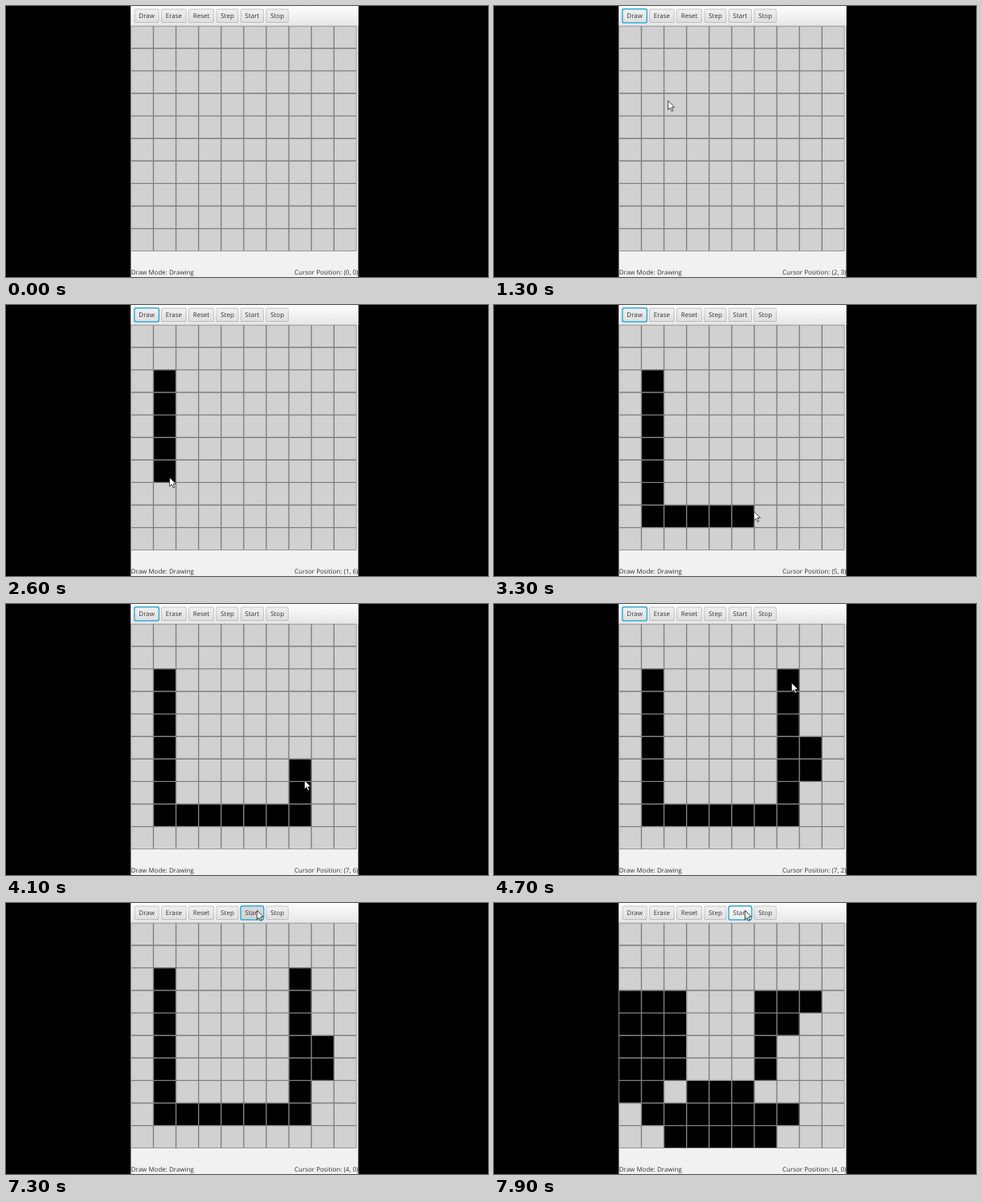
These frames come from a looping animation (600x338 px, 8000 ms). An HTML page with a canvas:

```html
<!DOCTYPE html>
<html lang="en">
<head>
<meta charset="utf-8">
<title>Cell grid</title>
<style>
  html, body { margin: 0; width: 100%; height: 100%; overflow: hidden; background: #000; }
  canvas { display: block; width: 600px; height: 338px; }
</style>
</head>
<body>
<canvas id="stage" width="600" height="338"></canvas>
<script>
const ctx = document.getElementById('stage').getContext('2d');
const LOOP = 8000, TICK = 100;
const N = 10, PITCH = 28.1, LEFT = 155.4, TOP = 24.7, SIZE = N * PITCH;
const WIDTH = 283.1, BUTTON_TOP = 3.6, BUTTON_HEIGHT = 17.4, PADDING = 5.6, GAP = 2.6;
const SHOW_CURSOR = 500, FOCUS_DRAW = 1000, PEN_DOWN = 2100, PEN_UP = 4800;
const FOCUS_START = 7200, RELEASE = 7400, STEP_AT = 7900;

ctx.font = '8px "Open Sans", "Noto Sans", sans-serif';
ctx.textRendering = 'geometricPrecision';

// Eased pointer moves
const HOME = { x: 160, y: 30 };
const move = (from, to, x, y) => ({ from, to, x, y });
const MOVES = [
  move(100, 300, 240, 100),
  move(400, 800, 170, 14),
  move(1000, 1350, 219, 124),
  move(1400, 1800, 198, 91),
  move(2100, 2850, 205, 258),
  move(3000, 3400, 345, 257),
  move(3400, 3950, 366, 260),
  move(3950, 4150, 372, 212),
  move(4150, 4250, 388, 206),
  move(4250, 4350, 382, 182),
  move(4350, 4700, 370, 98),
  move(4700, 4900, 370, 93),
  move(5000, 5300, 281, 26),
  move(5700, 5950, 268, 12),
  move(5950, 6200, 334, 10),
  move(6400, 6900, 312, 9)
];

function pointer(t) {
  let { x, y } = HOME;
  for (const m of MOVES) {
    if (t <= m.from) break;
    const k = Math.min(1, (t - m.from) / (m.to - m.from));
    const ease = k * k * (3 - 2 * k);
    x += (m.x - x) * ease;
    y += (m.y - y) * ease;
  }
  return { x, y };
}

function cellAt(t) {
  const { x, y } = pointer(t);
  const col = Math.floor((x - LEFT) / PITCH), row = Math.floor((y - TOP) / PITCH);
  return row < 0 ? null : [col, row];
}

function lastCell(now) {
  for (let t = now; t > 0; t -= TICK) {
    const cell = cellAt(t);
    if (cell) return cell;
  }
  return [0, 0];
}

function drawnCells(now) {
  const cells = new Set();
  for (let t = PEN_DOWN; t <= Math.min(now, PEN_UP); t += 10) cells.add(cellAt(t).join());
  return cells;
}

function nextGeneration(cells) {
  const next = new Set();
  for (let c = 0; c < N; c++) for (let r = 0; r < N; r++) {
    let around = 0;
    for (let dc = -1; dc <= 1; dc++) for (let dr = -1; dr <= 1; dr++) {
      if ((dc || dr) && cells.has([c + dc, r + dr].join())) around++;
    }
    const key = [c, r].join();
    if (around === 3 || (around === 2 && cells.has(key))) next.add(key);
  }
  return next;
}

function shade(y0, y1, from, to) {
  const g = ctx.createLinearGradient(0, y0, 0, y1);
  g.addColorStop(0, from);
  g.addColorStop(1, to);
  return g;
}

function text(s, x, y, align) {
  ctx.textAlign = align;
  ctx.fillStyle = '#333';
  ctx.fillText(s, x, y);
}

function drawButton(label, x, w, focused, hovered, armed) {
  const y = BUTTON_TOP, h = BUTTON_HEIGHT;
  const box = (grow, radius, fill) => {
    ctx.beginPath();
    ctx.roundRect(x - grow, y - grow, w + 2 * grow, h + 2 * grow, radius);
    ctx.fillStyle = fill;
    ctx.fill();
  };
  if (focused) {
    box(1, 3, '#b9dfec');
    box(0.4, 2.5, '#22a6d4');
  } else {
    box(0, 2.2, shade(y, y + h, '#c4c4c4', '#b2b2b2'));
  }
  const body = armed ? ['#dcdcdc', '#d2d2d2'] : hovered ? ['#fafafa', '#ececec'] : ['#f1f1f1', '#dedede'];
  box(-0.8, 1.6, shade(y, y + h, ...body));
  text(label, x + w / 2, 15.4, 'center');
}

function drawToolbar(t, cursor) {
  ctx.fillStyle = shade(0, TOP, '#fdfdfd', '#e6e6e6');
  ctx.fillRect(LEFT, 0, WIDTH, TOP);
  const focus = t >= FOCUS_START ? 'Start' : t >= FOCUS_DRAW ? 'Draw' : '';
  const overRow = t >= SHOW_CURSOR && cursor.y > BUTTON_TOP && cursor.y < BUTTON_TOP + BUTTON_HEIGHT;
  let x = LEFT + 4.3;
  for (const label of ['Draw', 'Erase', 'Reset', 'Step', 'Start', 'Stop']) {
    const w = ctx.measureText(label).width + 2 * PADDING;
    const hovered = overRow && cursor.x >= x && cursor.x <= x + w;
    drawButton(label, x, w, label === focus, hovered, hovered && t >= FOCUS_START && t < RELEASE);
    x += w + GAP;
  }
}

function drawGrid(cells) {
  ctx.save();
  ctx.beginPath();
  ctx.rect(LEFT, TOP, SIZE, SIZE);
  ctx.fillStyle = '#d2d1d2';
  ctx.fill();
  ctx.clip();
  ctx.translate(LEFT, TOP);
  ctx.fillStyle = '#000';
  for (const key of cells) {
    const [c, r] = key.split(',');
    ctx.fillRect(c * PITCH, r * PITCH, PITCH, PITCH);
  }
  ctx.beginPath();
  for (let d = 0, i = 0; i <= N; d = ++i * PITCH) {
    ctx.moveTo(d, 0);
    ctx.lineTo(d, SIZE);
    ctx.moveTo(0, d);
    ctx.lineTo(SIZE, d);
  }
  ctx.strokeStyle = '#808080';
  ctx.lineWidth = 1.4;
  ctx.stroke();
  ctx.restore();
}

function drawCursor({ x, y }) {
  ctx.save();
  ctx.translate(x + 0.4, y + 0.3);
  ctx.scale(0.7, 0.7);
  const arrow = new Path2D('M0 0V16L3.8 12.6L6.5 18.5L9 17.4L6.4 11.6L11.4 11.4Z');
  ctx.fillStyle = '#fff';
  ctx.fill(arrow);
  ctx.strokeStyle = '#111';
  ctx.lineWidth = 1.1;
  ctx.stroke(arrow);
  ctx.restore();
}

function render(t) {
  const cursor = pointer(t);
  ctx.fillStyle = '#000';
  ctx.fillRect(0, 0, 600, 338);
  ctx.fillStyle = '#f1f1f1';
  ctx.fillRect(LEFT, 0, WIDTH, 338);
  drawToolbar(t, cursor);
  const cells = drawnCells(t);
  drawGrid(t >= STEP_AT ? nextGeneration(cells) : cells);
  text('Draw Mode: Drawing', LEFT + 0.3, 334.6, 'left');
  text(`Cursor Position: (${lastCell(t).join(', ')})`, LEFT + WIDTH - 0.1, 334.6, 'right');
  if (t >= SHOW_CURSOR) drawCursor(cursor);
}

const start = performance.now();
function frame() {
  const t = (performance.now() - start) % LOOP;
  render(Math.floor(t / TICK) * TICK);
  requestAnimationFrame(frame);
}
frame();
</script>
</body>
</html>
```
